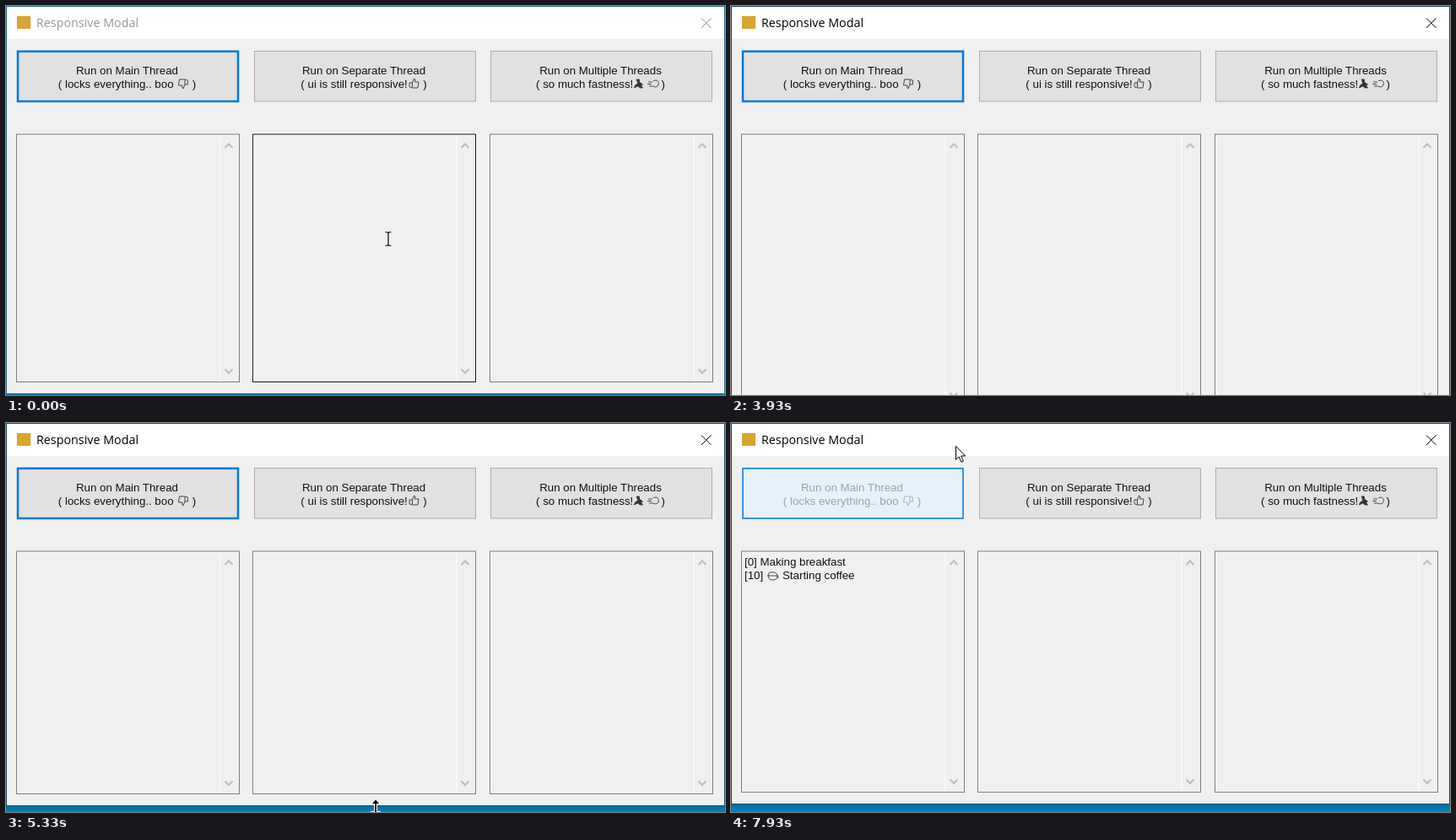
These frames come from a looping animation (852 by 461 pixels, 8 s). An HTML page:

```html
<!DOCTYPE html>
<html lang="en">
<head>
<meta charset="utf-8">
<title>Responsive Modal</title>
<style>
  html, body { margin: 0; width: 100%; height: 100%; overflow: hidden; background: #0191cf; }
  svg { display: block; width: 852px; height: 461px; }
  text { font: 13.3px "Liberation Sans", Arial, sans-serif; fill: #111; white-space: pre; }
  .label { text-anchor: middle; }
  .title { font: 14.3px "Open Sans", "Noto Sans", sans-serif; }
  .glyph { fill: none; stroke: #444; stroke-linejoin: round; stroke-linecap: round; }
  .chevron { fill: none; stroke: #bdbdbd; stroke-width: 2; }
  .white { fill: none; stroke: #fff; }
</style>
</head>
<body>
<svg viewBox="0 0 852 461" xmlns="http://www.w3.org/2000/svg">
  <defs>
    <linearGradient id="shade" x1="0" y1="0" x2="0" y2="1">
      <stop offset="0" stop-color="#002238" stop-opacity=".34"/>
      <stop offset=".4" stop-color="#002238" stop-opacity=".14"/>
      <stop offset="1" stop-color="#002238" stop-opacity="0"/>
    </linearGradient>
  </defs>
  <rect width="852" height="461" fill="#0191cf"/>
  <rect id="shadow" width="852" height="16" fill="url(#shade)"/>
  <rect id="client" width="852" fill="#f0f0f0"/>
  <rect width="852" height="39" fill="#fff"/>
  <rect id="frame" x=".5" y=".5" width="851" fill="none"/>
  <rect x="13" y="12" width="16" height="15" fill="#d8a52f"/>
  <text id="title" class="title" x="36" y="25">Responsive Modal</text>
  <path id="close" d="M824 14.5l11.5 11.5m0 -11.5l-11.5 11.5" fill="none"/>
  <g id="buttons"></g>
  <g id="panels"></g>
  <g id="log">
    <text x="16" y="169">[0] Making breakfast</text>
    <g id="secondLine">
      <text x="16" y="185">[10]</text>
      <path class="glyph" d="M44 181h11q0 5 -5.500 5t-5.500 -5zq0 -5 5 -4q5 -1 6 4q2 0 0 3"/>
      <text x="61" y="185">Starting coffee</text>
    </g>
  </g>
  <g id="cursor">
    <path id="beam" d="M-3.500 -8h2.500l1 1l1 -1h2.500M0 -7v14M-3.500 8h2.500l1 -1l1 1h2.500" fill="none" stroke="#000" stroke-width="1.2"/>
    <path id="arrow" d="M.5 .5v16l3.700 -3.500l2.800 6.300l2.400 -1.100l-2.700 -6.200h5z" fill="#fff" stroke="#000"/>
    <path id="resize" d="M0 -9.500l4 4.500h-3v10h3l-4 4.500l-4 -4.500h3v-10h-3z" fill="#000" stroke="#fff" stroke-width="2" paint-order="stroke"/>
  </g>
</svg>
<script>
const LOOP = 8000, STEP = 1000 / 15;
const DRAG_START = 2867, DRAG_END = 5800;
const MIN_BOTTOM = 360, FULL_BOTTOM = 460;
const PANEL_TOP = 152, PANEL_WIDTH = 264;

const $ = id => document.getElementById(id);
const set = (el, attrs) => { for (const k in attrs) el.setAttribute(k, attrs[k]); };
const show = (el, on) => el.setAttribute("visibility", on ? "inherit" : "hidden");

function add(parent, tag, attrs, text) {
  const el = document.createElementNS("http://www.w3.org/2000/svg", tag);
  set(el, attrs);
  if (text) el.textContent = text;
  return parent.appendChild(el);
}

const THUMB = "M-5 -1h3l2 -5q2 0 1 4h4.500l-1 7h-6.500l-3 -1zM-2 -1v5";
const RUNNER = "M-14 -5h3v3l4 3l-2 1l2 3h-3l-3 -2l-4 2l1 -3l3 -2z";
const DASH = "M0 -2h4m-5 2.500h4m-2 2.500h4M6 -3.500q5 -2 6 3q-1 6 -6 4";

// Spaces before ")" leave room for the icon at the given offset from the centre.
const buttons = [
  ["Run on Main Thread", "( locks everything.. boo      )", 66.5, THUMB, "rotate(180)"],
  ["Run on Separate Thread", "( ui is still responsive!     )", 59.5, THUMB, ""],
  ["Run on Multiple Threads", "( so much fastness!         )", 57, DASH, ""]
].map(([name, note, offset, icon, turn], i) => {
  const x = 13 + i * 280.5;
  const mid = x + 130.5;
  const box = add($("buttons"), "rect", { x: Math.round(x) + .5, y: 53.5, width: 262, height: 59.5, fill: "#e1e1e1", stroke: "#adadad" });
  const ink = add($("buttons"), "g", {});
  add(ink, "text", { class: "label", x: mid, y: 80.5 }, name);
  add(ink, "text", { class: "label", x: mid, y: 96.5 }, note);
  const art = add(ink, "g", { class: "glyph", transform: `translate(${mid + offset} 92) ${turn}` });
  add(art, "path", { d: icon });
  if (icon === DASH) add(art, "path", { d: RUNNER, fill: "#333" });
  return { box, ink };
});

const panels = [0, 1, 2].map(i => {
  const x = Math.round(12 + i * 280.4);
  const g = add($("panels"), "g", {});
  const inner = add(g, "path", { class: "white", opacity: .6 });
  const track = add(g, "path", { class: "white" });
  const box = add(g, "rect", { x: x + .5, y: PANEL_TOP, width: PANEL_WIDTH, fill: "none" });
  add(g, "path", { class: "chevron", d: `M${x + 247.5} 168l4.500 -4.500l4.500 4.500` });
  const down = add(g, "path", { class: "chevron", d: `M${x + 247.5} -15.500l4.500 4.500l4.500 -4.500` });
  return { x, inner, track, box, down };
});

// Pointer moves; ease 1 is linear, higher values slow down towards the end.
const MOVES = [
  { from: 867, to: 1400, x: 430, y: 404 },
  { from: 1400, to: 1800, x: 431, y: 465 },
  { from: 2000, to: 2267, x: 428, y: 462 },
  { from: 2867, to: 3333, x: 428, y: 525 },
  { from: 3667, to: 4600, x: 427, y: 362 },
  { from: 4933, to: 5333, x: 438, y: 456, ease: 3 },
  { from: 5600, to: 5667, x: 430, y: 454 },
  { from: 5867, to: 6267, x: 212, y: 105, ease: 1.43 },
  { from: 6533, to: 6800, x: 200, y: 93 },
  { from: 7333, to: 7933, x: 266, y: 27 }
];

function pointer(t) {
  let x = 453, y = 276;
  for (const m of MOVES) {
    const k = Math.min(1, Math.max(0, (t - m.from) / (m.to - m.from)));
    const eased = 1 - (1 - k) ** (m.ease || 1);
    x += (m.x - x) * eased;
    y += (m.y - y) * eased;
  }
  return { x, y };
}

// The dragged edge trails the pointer by one step.
function windowBottom(t) {
  if (t < DRAG_START) return FULL_BOTTOM;
  const { y } = pointer(Math.min(t, DRAG_END) - STEP);
  return Math.max(MIN_BOTTOM, Math.round(y - 2));
}

function panelUnder({ x, y }, floor) {
  return panels.find(p => x > p.x && x < p.x + PANEL_WIDTH && y > PANEL_TOP && y < floor);
}

function drawMainButton(t) {
  const disabled = t > 6920, pressed = t > 6720, hovered = t > 6260;
  set(buttons[0].box, {
    x: 14, y: 53.8, width: 261, height: 59.2,
    fill: disabled ? "#e5f1fb" : pressed ? "#cce4f7" : hovered ? "#e5f1fb" : "#e1e1e1",
    stroke: pressed && !disabled ? "#005499" : "#0078d7",
    "stroke-width": pressed ? 1.5 : 2.5
  });
  buttons[0].ink.setAttribute("opacity", disabled ? .34 : 1);
}

function render(time) {
  const t = Math.floor((time + 4) / STEP) * STEP + .5;
  const bottom = windowBottom(t);
  const floor = bottom - 14;
  const active = t > 2720;
  const resizing = t > 1720 && t < 5900;
  const tip = pointer(t);

  set($("shadow"), { y: bottom });
  set($("client"), { height: bottom });
  set($("frame"), { height: bottom - 1, stroke: active ? "#204d62" : "#2b7192" });
  $("title").style.fill = active ? "#000" : "#999";
  set($("close"), { stroke: active ? "#000" : "#8c8c8c" });
  drawMainButton(t);

  const hot = !resizing && panelUnder(pointer(t - STEP), floor);
  panels.forEach(p => {
    set(p.box, { height: floor - .5 - PANEL_TOP, stroke: p === hot ? "#1c1c1c" : "#7d7d7d" });
    set(p.inner, { d: `M${p.x + 1.5} ${floor - 1.5}V153.500h262` });
    set(p.track, { d: `M${p.x + 242} 153V${floor - 1}` });
    set(p.down, { transform: `translate(0 ${floor})` });
  });

  show($("log"), t > 6920);
  show($("secondLine"), t > 6990);

  const overPanel = panelUnder(tip, floor);
  show($("resize"), resizing);
  show($("beam"), !resizing && overPanel);
  show($("arrow"), !resizing && !overPanel);
  set($("cursor"), { transform: `translate(${Math.round(tip.x)} ${Math.round(tip.y)})` });
}

const start = performance.now();
function tick() {
  render((performance.now() - start) % LOOP);
  requestAnimationFrame(tick);
}
tick();
</script>
</body>
</html>
```
